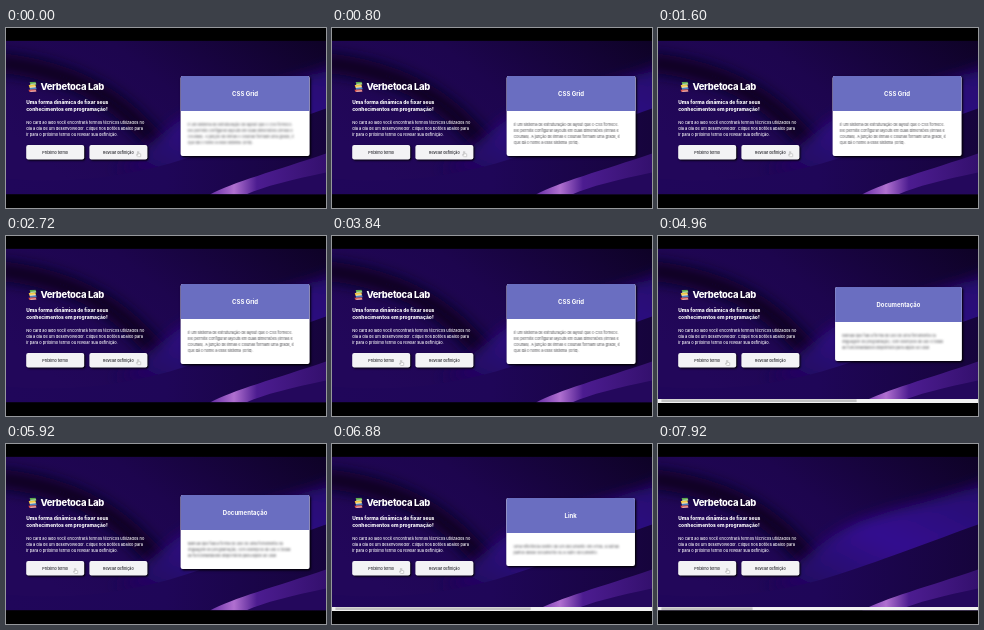
Animation of 320x180 px, one loop 8000 ms. Source, as an HTML page:

```html
<!DOCTYPE html>
<html lang="pt-BR">
<head>
<meta charset="utf-8">
<title>Verbetoca Lab</title>
<style>
  html, body { margin: 0; width: 100%; height: 100%; overflow: hidden; background: #000; }
  /* Laid out at 1600 x 900 and shown at one fifth */
  #stage { position: absolute; width: 1600px; height: 900px; transform: scale(.2); transform-origin: 0 0; overflow: hidden; font-family: Inter, "Open Sans", sans-serif; color: #fff; }
  #page { position: absolute; left: 0; top: 62px; width: 1600px; height: 770px; overflow: hidden; }
  #back { position: absolute; left: 0; top: 0; }
  .text { position: absolute; left: 101px; margin: 0; white-space: nowrap; }
  h1.text { left: 172px; top: 199px; font-size: 47px; line-height: 60px; font-weight: 800; letter-spacing: -1.5px; }
  h2.text { top: 293px; font-size: 24.5px; line-height: 35px; font-weight: 800; }
  p.text { top: 396px; font-size: 19.8px; line-height: 31px; font-weight: 500; }
  #books { position: absolute; left: 108px; top: 206px; }
  .button { position: absolute; top: 523px; width: 290px; height: 72px; line-height: 72px; border-radius: 10px; background: #f3f3f5; color: #1c1c22; font-size: 18.5px; font-weight: 500; text-align: center; box-shadow: 5px 5px 10px #000; }
  .next { left: 101px; }
  .reveal { left: 417px; }

  .slot { position: absolute; left: 873px; top: 0; width: 645px; height: 756px; display: flex; align-items: center; animation: 8s step-end infinite; }
  .card { width: 100%; border-radius: 10px; overflow: hidden; background: #fff; box-shadow: 6px 6px 12px #000; }
  .card h3 { margin: 0; height: 175px; line-height: 175px; background: #6a6ec1; font-size: 30px; font-weight: 700; text-align: center; }
  .card p { margin: 0; padding: 54px 0 51px 36px; font-size: 18.6px; line-height: 30px; color: #4a4a4e; white-space: nowrap; }
  .blur { filter: blur(6px); }
  .grid { animation-name: first; }
  .docs { animation-name: second; }
  .link { animation-name: third; }
  .grid p { animation: reveal 8s step-end infinite; }
  .docs .card, .link .card { animation: bounce 8s cubic-bezier(.215, .61, .355, 1) infinite; }
  .docs .card { animation-delay: -3.8s; }
  .link .card { animation-delay: -2.04s; }
  @keyframes first { 0% { visibility: visible } 52.5%, 100% { visibility: hidden } }
  @keyframes second { 0% { visibility: hidden } 52.5% { visibility: visible } 74.5%, 100% { visibility: hidden } }
  @keyframes third { 0% { visibility: hidden } 74.5% { visibility: visible } 97.5%, 100% { visibility: hidden } }
  @keyframes reveal { 0% { filter: blur(6px) } 10%, 100% { filter: none } }
  @keyframes bounce {
    0% { opacity: 0; transform: translateX(3000px) scaleX(3) }
    7.5% { opacity: 1; transform: translateX(-25px) scaleX(1) }
    9.375% { opacity: 1; transform: translateX(10px) scaleX(.98) }
    11.25% { opacity: 1; transform: translateX(-5px) scaleX(.995) }
    12.5%, 100% { opacity: 1; transform: translateX(0) scaleX(1) }
  }

  /* The bar appears while a card flies in; its thumb is resized 200 ms later */
  #bar { position: absolute; left: 0; bottom: 0; width: 100%; height: 17px; background: #f1f1f1; animation: bar 8s step-end infinite; }
  #thumb { position: absolute; left: 17px; top: 2px; height: 13px; background: #c1c1c1; animation: thumb 8s step-end infinite; }
  @keyframes bar {
    0% { visibility: hidden } 52.5% { visibility: visible } 65% { visibility: hidden }
    74.5% { visibility: visible } 87% { visibility: hidden } 97.5%, 100% { visibility: visible }
  }
  @keyframes thumb {
    0% { width: 456px } 55% { width: 976px } 74.5% { width: 456px }
    77% { width: 976px } 97.5%, 100% { width: 456px }
  }

  #hand { position: absolute; left: 0; top: 0; animation: point 8s ease-in-out infinite; }
  @keyframes point {
    0%, 34% { transform: translate(651px, 616px) }
    42%, 100% { transform: translate(336px, 620px) }
  }
</style>
</head>
<body>
<div id="stage">
  <div id="page">
    <svg id="back" width="1600" height="770" viewBox="0 0 320 154">
      <defs>
        <linearGradient id="base" x1="0" y1=".6" x2="1" y2="0">
          <stop offset="0" stop-color="#22075a"/>
          <stop offset=".5" stop-color="#1d054e"/>
          <stop offset="1" stop-color="#0e0226"/>
        </linearGradient>
        <linearGradient id="sweep" x1="0" y1="1" x2="1" y2="0">
          <stop offset="0" stop-color="#1c0550"/>
          <stop offset=".5" stop-color="#340a90"/>
          <stop offset="1" stop-color="#24066a"/>
        </linearGradient>
        <linearGradient id="low" x1="0" y1="0" x2="1" y2="0">
          <stop offset="0" stop-color="#20065a"/>
          <stop offset=".5" stop-color="#1f0658"/>
          <stop offset="1" stop-color="#16043c"/>
        </linearGradient>
        <linearGradient id="tip" gradientUnits="userSpaceOnUse" x1="205" y1="0" x2="320" y2="0">
          <stop offset="0" stop-color="#6a30a8"/>
          <stop offset=".2" stop-color="#b070d0"/>
          <stop offset=".4" stop-color="#4c1c90"/>
          <stop offset="1" stop-color="#34106e"/>
        </linearGradient>
        <filter id="soft" x="-20%" y="-40%" width="140%" height="180%"><feGaussianBlur stdDeviation="7"/></filter>
      </defs>
      <rect width="320" height="154" fill="url(#base)"/>
      <path d="M-10 22C50 28 90 46 120 72S150 110 185 122" fill="none" stroke="#0b0120" stroke-width="20" filter="url(#soft)"/>
      <path d="M110 130C150 100 170 76 210 62S290 42 335 22V85C260 90 220 125 150 140Z" fill="url(#sweep)" filter="url(#soft)"/>
      <path d="M0 138C65 144 125 136 180 118S270 86 320 68V154H0Z" fill="url(#low)"/>
      <path d="M204 154C226 142 270 130 320 113V154Z" fill="url(#tip)"/>
      <path d="M240 154C258 146 286 139 320 132V154Z" fill="#24085c"/>
    </svg>

    <svg id="books" width="50" height="54" viewBox="0 0 10 11">
      <path d="M2 .5l6-.3 1 2.8-6 .8z" fill="#5da94c"/>
      <path d="M1 3.5l6.8-.5.8 3-6.6.6z" fill="#f3c644"/>
      <path d="M2 6.3l6.5-.6.7 2.2-6.7.7z" fill="#4a83c4"/>
      <path d="M.8 8.4l7.2-.5 1.2 2.2-7.4.6z" fill="#d5504b"/>
      <path d="M2.6 2.8l5.7-.5M2.4 5.8l5.6-.4M2.7 9.9l5.700-.4" stroke="#fff" stroke-width=".7"/>
    </svg>
    <h1 class="text">Verbetoca Lab</h1>
    <h2 class="text">Uma forma dinâmica de fixar seus<br>conhecimentos em programação!</h2>
    <p class="text">No card ao lado você encontrará termos técnicos utilizados no<br>dia a dia de um desenvolvedor. Clique nos botões abaixo para<br>ir para o próximo termo ou revelar sua definição.</p>
    <div class="button next">Próximo termo</div>
    <div class="button reveal">Revelar definição</div>

    <div class="slot grid"><div class="card">
      <h3>CSS Grid</h3>
      <p>É um sistema de estruturação de layout que o CSS fornece.<br>Ele permite configurar layouts em duas dimensões (linhas e<br>colunas). A junção de linhas e colunas formam uma grade, é<br>que dá o nome a esse sistema (Grid).</p>
    </div></div>
    <div class="slot docs"><div class="card">
      <h3>Documentação</h3>
      <p class="blur">Manual que fala a forma de uso de uma ferramenta ou<br>linguagem de programação, com exemplos de uso e todas<br>as funcionalidades disponíveis para aquilo ao usar.</p>
    </div></div>
    <div class="slot link"><div class="card">
      <h3>Link</h3>
      <p class="blur">Uma referência dentro de um documento em HTML a outras<br>partes desse documento ou a outro documento.</p>
    </div></div>

    <div id="bar"><div id="thumb"></div></div>
  </div>

  <svg id="hand" width="25" height="30" viewBox="0 0 14 17">
    <path d="M4 9V2q0-1.400 1.200-1.400T6.400 2v4.500l5 1q1.600.4 1.500 2l-.6 4-1 3H5.600L1 11q-.8-1.300.4-1.800T4 11z" fill="#fff" stroke="#666" stroke-width="1"/>
  </svg>
</div>
</body>
</html>
```
